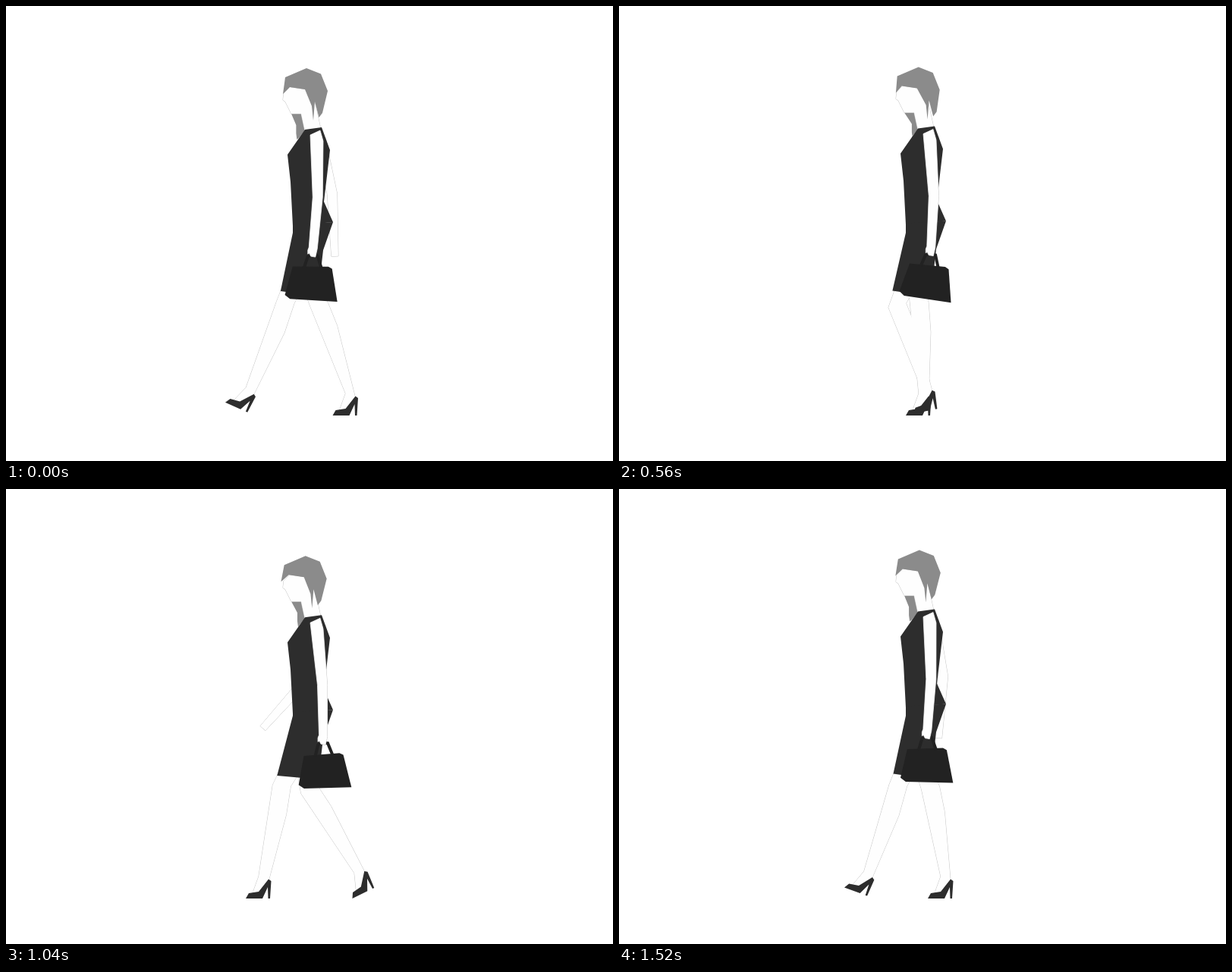
An HTML page with a canvas for the animation above (1.6 s loop, 800 px wide and 600 px high).

```html
<!DOCTYPE html>
<html lang="en">
<head>
<meta charset="utf-8">
<title>Walk cycle</title>
<style>
html, body { margin: 0; width: 100%; height: 100%; overflow: hidden; background: #fff; }
canvas { display: block; width: 800px; height: 600px; }
</style>
</head>
<body>
<canvas id="stage" width="800" height="600"></canvas>
<script>
const ctx = document.getElementById('stage').getContext('2d');
const LOOP = 1600, STRIDE = LOOP / 2, STEP = 80, GROUND = 540;
const SKIN = '#fefefe', EDGE = '#c4c4c4', DRESS = '#2d2d2d', BAG = '#222', HAIR = '#8b8b8b';

// Key poses of one foot: time, toe x, tilt in degrees
const FOOT = [
  [0, 289, 24], [80, 300, 10], [240, 316, 0], [400, 351, 0], [720, 407, 0], [800, 430.5, 0],
  [880, 438.5, 0], [1040, 456.5, -26], [1200, 436, -28], [1360, 388, -11], [1520, 297, 20]
];
const SHOE = [[0, 0], [4, -7], [17, -9], [30, -25.5], [33.5, -23], [32, 0], [29.5, 0], [29, -15], [22, 0]];

const wave = (t, peak, period = LOOP) => Math.cos(2 * Math.PI * (t - peak) / period);
const shift = (points, dx, dy) => points.map(([x, y]) => [x + dx, y + dy]);

function place(points, x, y, deg) {
  const a = deg * Math.PI / 180, c = Math.cos(a), s = Math.sin(a);
  return points.map(([px, py]) => [x + px * c - py * s, y + px * s + py * c]);
}

function trace(points) {
  ctx.beginPath();
  points.forEach(p => ctx.lineTo(p[0], p[1]));
}

function fill(points, color) {
  trace(points);
  ctx.closePath();
  ctx.fillStyle = color;
  ctx.fill();
}

// Several skin shapes sharing one faint outer contour
function skin(...shapes) {
  ctx.strokeStyle = EDGE;
  ctx.lineWidth = 1;
  for (const s of shapes) {
    trace(s);
    ctx.closePath();
    ctx.stroke();
  }
  for (const s of shapes) fill(s, SKIN);
}

// Eases through the foot poses without overshoot
function footPose(t) {
  const n = FOOT.length;
  const key = (i, k) => FOOT[(i + n) % n][k] + (k ? 0 : LOOP * Math.floor(i / n));
  const slope = (i, k) => (key(i + 1, k) - key(i, k)) / (key(i + 1, 0) - key(i, 0));
  const tangent = (i, k) => {
    const a = slope(i - 1, k), b = slope(i, k);
    return a * b > 0 ? 2 * a * b / (a + b) : 0;
  };
  let i = n - 1;
  while (FOOT[i][0] > t) i--;
  const h = key(i + 1, 0) - key(i, 0), s = (t - key(i, 0)) / h;
  const mix = s * s * (3 - 2 * s);
  return [1, 2].map(k => key(i, k) * (1 - mix) + key(i + 1, k) * mix
    + h * s * (1 - s) * (tangent(i, k) * (1 - s) - tangent(i + 1, k) * s));
}

function leg(time) {
  const t = time % LOOP;
  const [x, deg] = footPose(t);
  const lift = t > 1040 && t < 1520 ? 3 * Math.sin(Math.PI * (t - 1040) / 480) : 0;
  const y = GROUND - 0.72 * Math.max(0, deg) - lift;
  const [ankle, instep, vamp, heel, mid] =
    place([[17, -29], [9, -7], [17, -8], [30, -23], [24, -28]], x, y, deg);

  // The knee swings on an arc around the hip
  const kx = 383.3 - 24.5 * wave(t, 20) + 6.9 * wave(t, 0, LOOP / 2) + 2.1 * wave(t, 0, LOOP / 3);
  const ky = 303 + Math.sqrt(93 ** 2 - (kx - 388) ** 2);
  const d = Math.hypot(mid[0] - kx, mid[1] - ky);
  const ux = (mid[0] - kx) / d, uy = (mid[1] - ky) / d;
  const along = (down, back) => [kx + ux * down + uy * back, ky + uy * down - ux * back];

  return {
    kneeX: kx,
    shape: [[378, 335], along(0, -12), ankle, instep, vamp, heel,
      along(35, 13), [kx + 12, 392], [402, 350]],
    shoe: place(SHOE, x, y, deg)
  };
}

function farArm(t, bob) {
  const ex = 410 + 21 * wave(t, 80), ey = 248 + bob;
  const bend = 16 + 26 * wave(t, 1000);
  const forearm = place([[-6.5, 0], [-4.5, 82], [4.5, 82], [6.5, 0]], ex, ey, bend);
  skin([[407, 174 + bob], ...forearm, [421, 174 + bob]]);
}

function head(t, bob) {
  const nod = wave(t, 0, STRIDE) - 1;
  const sway = wave(t, 400);
  const tip = 385 - 2 * wave(t, -160);
  fill(shift([[376, 142], [389, 142], [394, 164], [386, 174], [tip, 176],
    [tip - 1, 168], [tip - 1, 157]], 0, bob), HAIR);
  skin(shift([[374, 107], [366, 115], [365, 124], [368, 126], [371, 132], [376, 142],
    [389, 142], [394, 165], [415, 163], [410, 140], [405, 118], [394, 110]], 0, bob));
  fill([
    ...shift([[374, 107], [365 + 1.5 * sway, 116], [368, 94], [396, 82], [415, 89.5],
      [424, 112]], nod, bob),
    ...shift([[417, 141], [412.5, 147], [407, 126], [405, 151], [403, 132]], 2 * sway, bob),
    [394 + nod, 110 + bob]
  ], HAIR);
}

function dress(hem, bob) {
  fill(shift([[394, 163], [416, 160], [427, 190], [419, 258], [431, 285],
    [378, 290], [375, 232], [371, 196]], 0, bob), DRESS);
  fill([[378, 288 + bob], [431, 285 + bob], [418, 322 + bob], [415.5, 344 + bob],
    [413, 383], [hem, 376 + bob * 0.3], [378, 299]], DRESS);
}

function bagAndArm(t, bob) {
  const elbow = 407.5 - 3.5 * wave(t, 100);
  const wrist = 405 - 7.5 * wave(t, 150);
  const x = wrist + 6, y = 328 + bob;
  const tilt = 3.4 + 6.3 * wave(t, 400);

  fill(place([[-26, 17], [-34, 55], [-27, 60], [35.5, 60], [26, 17], [21, 14.5]], x, y, tilt), BAG);
  trace(place([[-11, 18], [-7, 3], [-3, 0], [6, 1], [12, 17]], x, y, tilt));
  ctx.strokeStyle = BAG;
  ctx.lineWidth = 4;
  ctx.stroke();

  skin(shift([[401, 170], [414, 164], [418, 178], [elbow + 13, 252], [wrist + 11.5, 320],
    [wrist + 9, 331], [wrist + 3, 330], [wrist + 1, 326], [wrist - 1, 327],
    [wrist - 1, 322], [wrist + 0.5, 318], [elbow, 252]], 0, bob));
}

function draw(t) {
  const bob = 1.75 + 4.1 * wave(t, 240, STRIDE) + 0.5 * wave(t, 240, STRIDE / 2);
  const legs = [leg(t), leg(t + STRIDE)];
  const hem = Math.min(...legs.map(l => l.kneeX)) - 6;
  ctx.fillStyle = '#fff';
  ctx.fillRect(0, 0, 800, 600);
  farArm(t, bob);
  skin(...legs.map(l => l.shape));
  legs.forEach(l => fill(l.shoe, DRESS));
  head(t, bob);
  dress(hem, bob);
  bagAndArm(t, bob);
}

const start = performance.now();
function tick() {
  const t = (performance.now() - start) % LOOP;
  draw(Math.floor(t / STEP) * STEP);
  requestAnimationFrame(tick);
}
tick();
</script>
</body>
</html>
```
